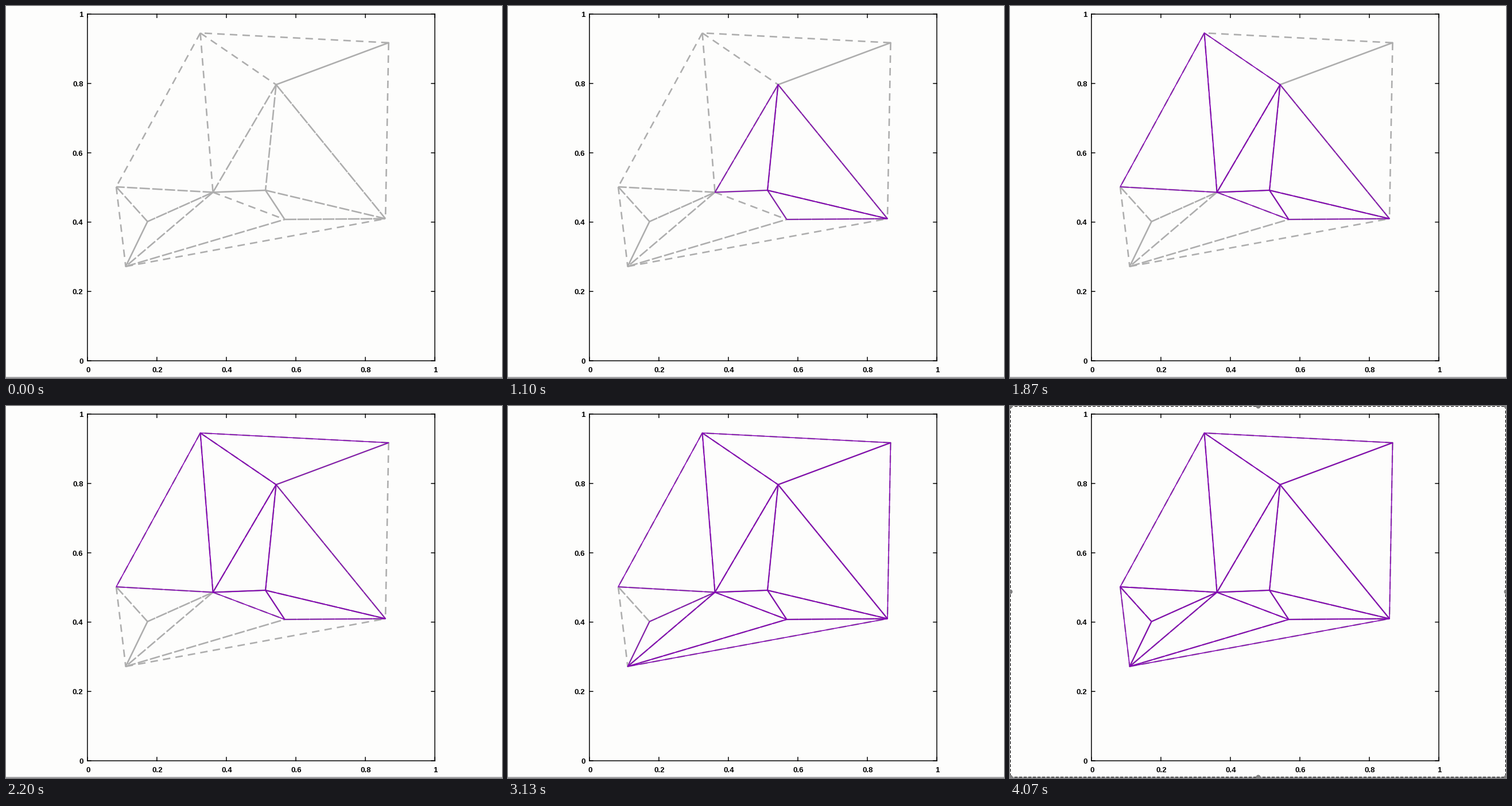
Animation, 864 px wide and 648 px high, one loop 4.1 s. Source, as a matplotlib script:

```python
import matplotlib.pyplot as plt
from matplotlib.animation import FuncAnimation

W, H = 864, 648
LOOP, STEP = 4100, 41          # ms
PERIOD = 280                   # ms between two triangles
LEFT, RIGHT, TOP, BOTTOM = 141.8, 747, 14.2, 618
PAPER, GREY, PURPLE, INK = "#fdfdfc", "#adadad", "#8404b4", "#000000"

plt.rcParams["font.family"] = "Liberation Sans"
plt.rcParams["lines.scale_dashes"] = False   # dash lengths in pixels

# Vertices in stage pixels
P = {
    "A": (470.5, 137), "B": (360.5, 324.5), "C": (452, 321), "D": (485.5, 371.8),
    "E": (661, 370.5), "F": (666.5, 64), "G": (338.5, 47), "H": (192, 315),
    "I": (246.5, 375.5), "J": (208.5, 453.7),
}

# Triangles in the order they are found
TRIANGLES = ("ABC ACE CDE BCD ABG BGH AGF AEF "
             "DEJ BDJ BIJ BHI HIJ").split()

# Shared edges carry two overlapping dashes, so they look denser
DASHES = {
    "solid": ("AF IJ BC CD", "-"),
    "dense": ("AE DE BI", (0, (20.5, 1.5))),
    "long": ("AB AC CE BH BJ JD HI", (0, (18, 4))),
    "open": ("FG GH HJ JE FE GA GB BD", (0, (13, 9))),
}

fig = plt.figure(figsize=(W / 72, H / 72), dpi=72, facecolor=PAPER)
ax = fig.add_axes([0, 0, 1, 1])
ax.set_xlim(0, W)
ax.set_ylim(H, 0)
ax.axis("off")


def path(names, **style):
    xs, ys = zip(*(P[n] for n in names))
    return ax.plot(xs, ys, dash_capstyle="butt", solid_joinstyle="round", **style)[0]


def segment(x0, y0, x1, y1, width=1.5, color=INK, **style):
    return ax.plot([x0, x1], [y0, y1], color=color, lw=width, snap=False, **style)[0]


def draw_frame():
    for x in (LEFT, RIGHT):
        segment(x, TOP, x, BOTTOM)
    for y in (TOP, BOTTOM):
        segment(LEFT, y, RIGHT, y)
    for i in range(6):
        x = LEFT + (RIGHT - LEFT) * i / 5
        y = BOTTOM - (BOTTOM - TOP) * i / 5
        segment(x, BOTTOM, x, BOTTOM - 6)
        segment(x, TOP, x, TOP + 6)
        segment(LEFT, y, LEFT + 6, y)
        segment(RIGHT, y, RIGHT - 6, y)
        label = f"{i / 5:g}"
        font = dict(fontsize=13.2, fontweight="bold", color=INK)
        ax.text(x + 1, 638, label, ha="center", va="baseline", **font)
        ax.text(134.5, y + 4.8, label, ha="right", va="baseline", **font)
    segment(0, 647, W, 647, 1.3, "#77777c")


def draw_selection():
    style = dict(linestyle=(0, (5, 3)), dash_capstyle="butt")
    parts = [segment(0, y, W, y, 1.2, **style) for y in (0.5, 646.5)]
    parts += [segment(x, 0, x, H, 1.2, **style) for x in (0.5, W - 0.5)]
    spots = [(x, y) for x in (0, W / 2, W) for y in (0, 323, 646)
             if (x, y) != (W / 2, 323)]
    xs, ys = zip(*spots)
    parts += ax.plot(xs, ys, "o", ms=8, color="#808080", mew=0)
    return parts


draw_frame()
for edges, dash in DASHES.values():
    for edge in edges.split():
        path(edge, color=GREY, lw=2.6, linestyle=dash, solid_capstyle="round")
found = [path(t + t[0], color=PURPLE, lw=1.6) for t in TRIANGLES]
selection = draw_selection()


def update(frame):
    count = frame * STEP // PERIOD
    for i, tri in enumerate(found):
        tri.set_visible(i < count)
    for part in selection:
        part.set_visible(frame == LOOP // STEP - 1)
    return found + selection


anim = FuncAnimation(fig, update, frames=LOOP // STEP, interval=STEP,
                     repeat=True, repeat_delay=0, blit=False)
plt.show()
```
